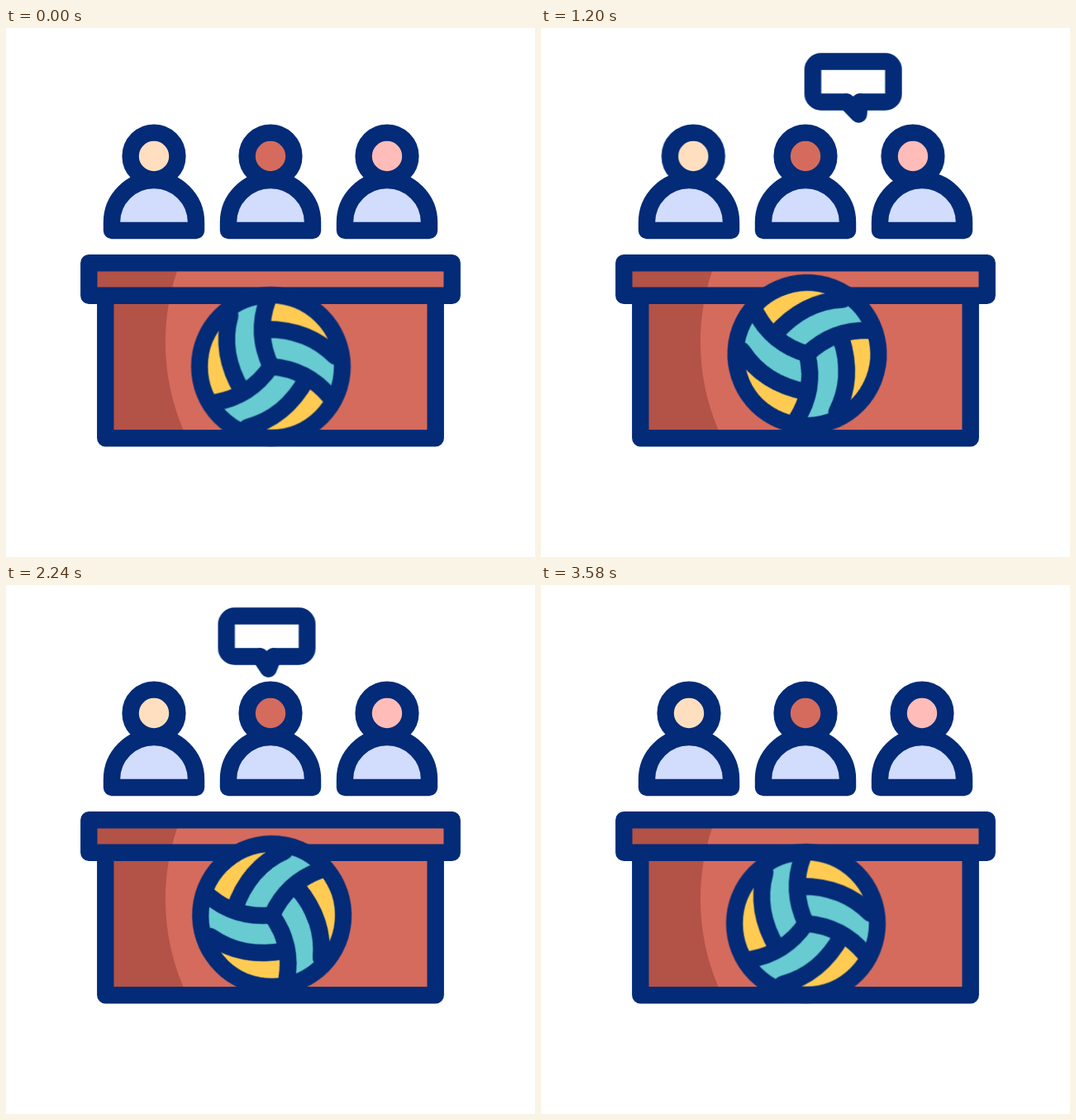
An HTML page without scripts that plays this animation: 640x640 px, repeating every 3600 ms.

```html
<!DOCTYPE html>
<html lang="en">
<head>
<meta charset="utf-8">
<title>Volleyball judges</title>
<style>
  html, body { margin: 0; width: 100%; height: 100%; overflow: hidden; background: #fff; }
  svg { display: block; width: 100vw; height: 100vh; }

  .line { fill: none; stroke: #032b77; stroke-width: 20.4; stroke-linecap: round; stroke-linejoin: round; }
  .shirt { fill: #d2dcfd; }

  .ball, .left, .right, .bubble, .pop, .tail {
    animation: 3.6s cubic-bezier(.37, 0, .63, 1) infinite;
  }
  .ball { animation-name: ball; }
  .left { animation-name: lean-left; }
  .right { animation-name: lean-right; }
  .bubble { animation-name: travel; }
  .pop { animation-name: pop; transform-origin: 0 45px; }
  .tail { animation-name: point; }

  @keyframes ball {
    0%, 100% { transform: translate(320.5px, 409.5px) rotate(0deg); }
    13.333%  { transform: translate(320px, 392.5px) rotate(86deg); }
    33.333%  { transform: translate(322px, 394.5px) rotate(72deg); }
    47.222%  { transform: translate(319.7px, 380.5px) rotate(164deg); }
    62.222%  { transform: translate(321.7px, 399.5px) rotate(50deg); }
    73.333%  { transform: translate(321.7px, 401px) rotate(44deg); }
  }
  @keyframes lean-left {
    0%, 37.69%, 100% { transform: none; }
    13.333%, 25% { transform: translateX(20.5px); }
  }
  @keyframes lean-right {
    0%, 25%, 61.667%, 100% { transform: none; }
    37.69%, 48.333% { transform: translateX(-15px); }
  }
  @keyframes travel {
    0%, 25% { transform: translate(256.3px, 65px); }
    37.69%, 48.333% { transform: translate(420px, 65px); }
    61.667%, 100% { transform: translate(315.5px, 65px); }
  }
  @keyframes pop {
    0%, 1% { transform: translateY(-10px) scale(0); }
    12%, 25% { transform: translateY(-10px) scale(1); }
    33.333%, 48.333% { transform: translateY(0) scale(1); }
    61.667%, 77% { transform: translateY(-3px) scale(1); }
    88.333%, 100% { transform: translateY(-3px) scale(0); }
  }
  @keyframes point {
    0%, 25% { d: path("M-8 24.5L-7.5 39.5L8 24.5"); }
    37.69%, 48.333% { d: path("M-8 24.5L11.5 39.5L8 24.5"); }
    61.667%, 100% { d: path("M-8 24.5L2 39.5L8 24.5"); }
  }
</style>
</head>
<body>
<svg viewBox="0 0 640 640">
  <defs>
    <path id="torso" class="line shirt" style="fill:#d2dcfd" d="M-51 245H51V235A51 51 0 0 0 -51 235Z"/>
    <circle id="head" class="line" style="fill:inherit" cy="155" r="28.4"/>
    <path id="panel" fill="#67cbd1" d="M0 0L-9 -45Q45 -46 78 -12A80 80 0 0 1 71 36Q44 3.5 0 0Z"/>
    <path id="seams" class="line" d="M0 0Q-19 -40 -4 -80M-9 -45Q45 -46 78 -12"/>
  </defs>

  <!-- Judges -->
  <g transform="translate(179)">
    <use href="#torso"/>
    <g class="left" fill="#ffdfbf"><use href="#head"/></g>
  </g>
  <g transform="translate(320)">
    <use href="#torso"/>
    <use href="#head" fill="#d56b5d"/>
  </g>
  <g transform="translate(461)">
    <use href="#torso"/>
    <g class="right" fill="#ffbcb8"><use href="#head"/></g>
  </g>

  <!-- Speech bubble -->
  <g class="bubble">
    <g class="pop">
      <path class="line" d="M-8 24.5H-38.8a10 10 0 0 1 -10 -10V-14.5a10 10 0 0 1 10 -10H38.8a10 10 0 0 1 10 10V14.5a10 10 0 0 1 -10 10H8"/>
      <path class="line tail" d="M-8 24.5L2 39.5L8 24.5"/>
    </g>
  </g>

  <!-- Table -->
  <path fill="#d56b5d" d="M100 284H540V324H520V496H120V324H100Z"/>
  <path fill="#b35247" d="M100 284V324H120V496H219A270 270 0 0 1 207 294L210 284Z"/>
  <path class="line" d="M100.3 284.3H539.7V323.7H100.3ZM120.3 324V496.2H519.7V324"/>

  <!-- Ball -->
  <g class="ball">
    <circle r="86" fill="#ffcb52"/>
    <use href="#panel"/>
    <use href="#panel" transform="rotate(120)"/>
    <use href="#panel" transform="rotate(240)"/>
    <use href="#seams"/>
    <use href="#seams" transform="rotate(120)"/>
    <use href="#seams" transform="rotate(240)"/>
    <circle class="line" r="86.4"/>
  </g>
</svg>
</body>
</html>
```
